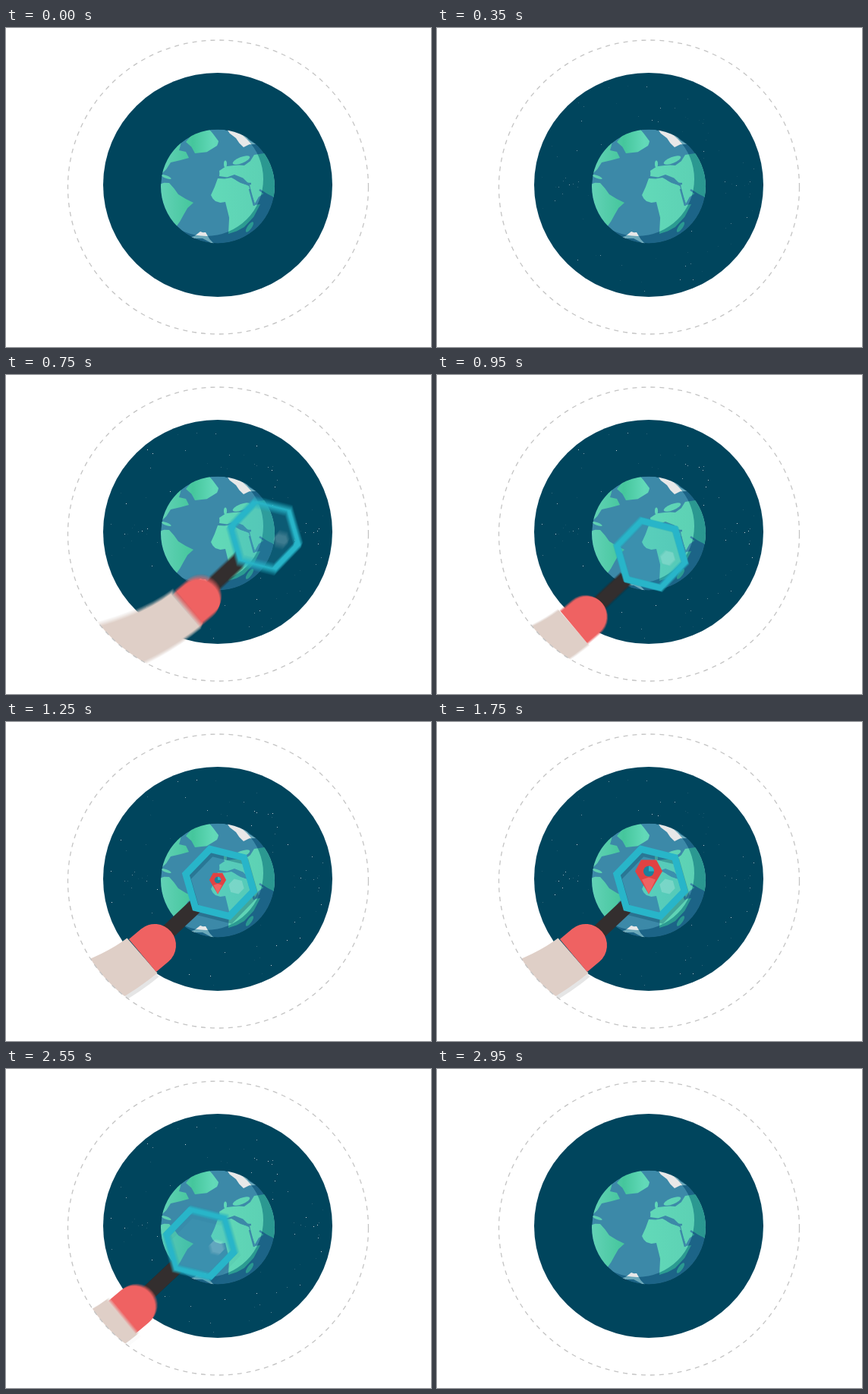
These frames come from a looping animation (560 by 420 pixels, 3.05 s). An HTML page with a canvas:

```html
<!DOCTYPE html>
<html lang="en">
<head>
<meta charset="utf-8">
<title>Exploring the globe</title>
<style>
  html, body { margin: 0; width: 100%; height: 100%; overflow: hidden; background: #fff; }
  canvas { display: block; }
</style>
</head>
<body>
<canvas id="stage" width="560" height="420"></canvas>
<script>
const W = 560, H = 420, LOOP = 3050, STEP = 50, SHUTTER = 16, SAMPLES = 12;
const TAU = Math.PI * 2, DEG = Math.PI / 180;
const OCEAN = '#3c89a8', TEAL = '#28b5c9', RED = '#ef6262';
const stage = document.getElementById('stage').getContext('2d');
const layer = () => Object.assign(document.createElement('canvas'), { width: W, height: H }).getContext('2d');
const scene = layer(), pose = layer();

const clamp = v => Math.max(0, Math.min(1, v));
const ramp = (t, a, b) => clamp((t - a) / (b - a));
let seed = 11;
const random = () => (seed = seed * 16807 % 2147483647) / 2147483647;

function fill(c, shape, color) {
  c.fillStyle = color;
  c.fill(shape);
}

function stroke(c, shape, color, width) {
  c.strokeStyle = color;
  c.lineWidth = width;
  c.stroke(shape);
}

function ellipse(x, y, rx, ry = rx, turn = 0) {
  const p = new Path2D();
  p.ellipse(x, y, rx, ry, turn * DEG, 0, TAU);
  return p;
}

function hexagon(x, y, r) {
  const p = new Path2D();
  for (let i = 0; i < 6; i++) {
    const a = 14 * DEG + i * TAU / 6;
    p.lineTo(x + r * Math.cos(a), y + r * Math.sin(a));
  }
  p.closePath();
  return p;
}

// Joins a few corner points with slightly ragged edges.
function coast(corners) {
  const nums = corners.split(' ').map(Number), p = new Path2D();
  for (let i = 0; i < nums.length; i += 2) {
    const [x, y] = [nums[i], nums[i + 1]];
    const [nx, ny] = [nums[(i + 2) % nums.length], nums[(i + 3) % nums.length]];
    const bump = (random() - .5) * .25;
    p.lineTo(x, y);
    p.lineTo((x + nx) / 2 + (y - ny) * bump, (y + ny) / 2 + (nx - x) * bump);
  }
  p.closePath();
  return p;
}

const ring = ellipse(279.5, 209.5, 198, 193.5);
const sky = ellipse(279, 206.5, 151, 147.5);
const globe = ellipse(279, 208.5, 75);

const lands = [
  coast('237 150 265 130 280 149 278 155 249 165'),                                   // Greenland
  coast('231 149 228 161 237 163 241 171 217 177 204 193 198 176'),                   // North America
  coast('202 206 215 204 227 219 247 230 234 246 224 262 202 240'),                   // South America
  coast('279 198 297 197 320 208 328 233 335 232 314 262 293 271 289 229 276 228 270 220'), // Africa
  coast('281 195 281 188 300 181 314 181 327 167 350 163 358 226 341 217 328 231 321 206 301 193'), // Eurasia
  ellipse(310, 174, 12, 4, -22),
  ellipse(289, 179, 2, 4.5),
  ellipse(321, 262, 2.8, 8, 35),
  ellipse(211, 196, 7, 1.8, 20)
];
const seas = new Path2D('M300 196Q310 206 323 205M321 212L327 234M334 213L346 221');
const ice = [
  coast('289 130 314 140 329 153 313 157 303 145'),
  coast('240 277 256 268 263 269 276 286')
];

const green = scene.createLinearGradient(204, 0, 354, 0);
[[0, '#62d2b6'], [.28, '#45c69c'], [.46, '#62d9b8'], [1, '#5bcfb3']].forEach(s => green.addColorStop(...s));

const night = new Path2D();
night.addPath(globe);
night.addPath(ellipse(264, 199, 75));

function drawGlobe(c) {
  c.save();
  c.clip(globe);
  fill(c, globe, OCEAN);
  lands.forEach(p => fill(c, p, green));
  stroke(c, seas, OCEAN, 2.5);
  ice.forEach(p => fill(c, p, '#e8e8e8'));
  c.globalCompositeOperation = 'multiply';
  c.fillStyle = '#75bacd';
  c.fill(night, 'evenodd');
  c.restore();
}

const stars = Array.from({ length: 80 }, () => {
  const a = random() * TAU, r = Math.sqrt(.22 + random() * .74);
  return { x: 279 + 149 * r * Math.cos(a), y: 206.5 + 145 * r * Math.sin(a), phase: random() * TAU };
});

function drawStars(c, t) {
  const shown = ramp(t, 0, 500) * (1 - ramp(t, 2650, 2950));
  c.fillStyle = '#fff';
  for (const s of stars) {
    c.globalAlpha = shown * (.08 + .7 * Math.sin(t / 500 + s.phase) ** 4);
    c.fillRect(Math.round(s.x), Math.round(s.y), 1, 1);
  }
  c.globalAlpha = 1;
}

// The lens slides in, spirals to rest at 1200 ms and drops away after 2250 ms.
function lensAt(t) {
  const left = clamp((1200 - t) / 700);
  const r = 115 * left ** 1.5, a = (146 - 296 * left ** 1.6) * DEG;
  const lead = Math.min(0, t - 500);
  const out = Math.max(0, (t - 2250) / 300);
  return [
    281.5 + r * Math.cos(a) + .89 * lead - 25.5 * out ** 3,
    211.5 + r * Math.sin(a) - 1.06 * lead + 18 * out ** 3.8
  ];
}

const frame = hexagon(0, 0, 46);
const glint = hexagon(22, 5, 10.5);
const handle = new Path2D('M-32 31L-80 76');
const sleeve = new Path2D('M-122 73Q-185 121 -340 140L-340 222Q-173 194 -82 119Z');
const grip = new Path2D('M21 -28L0 -28A28 28 0 0 0 0 28L21 28Z');

function drawHand(c, [x, y], depth) {
  c.save();
  c.translate(x, y);
  c.save();
  c.translate(2, 5);
  fill(c, sleeve, `rgba(0,0,0,${.1 * depth})`);
  c.restore();

  fill(c, frame, 'rgba(55,170,195,.22)');
  c.save();
  c.translate(2, 5);
  stroke(c, frame, `rgba(0,60,90,${.3 * depth})`, 9);
  c.restore();
  fill(c, glint, 'rgba(255,255,255,.2)');

  fill(c, sleeve, '#dfcfc7');
  stroke(c, handle, '#332e2e', 20);
  c.save();
  c.translate(-85.5, 82.5);
  c.rotate(140 * DEG);
  fill(c, grip, RED);
  c.restore();
  stroke(c, frame, TEAL, 9);
  c.restore();
}

// Averages several poses within the shutter time to blur the motion.
function drawBlurredHand(c, t) {
  const depth = ramp(t, 950, 1150) * (1 - ramp(t, 2250, 2600));
  for (let i = 0; i < SAMPLES; i++) {
    pose.drawImage(scene.canvas, 0, 0);
    pose.save();
    pose.clip(ring);
    drawHand(pose, lensAt(t + SHUTTER * ((i + .5) / SAMPLES - .5)), depth);
    pose.restore();
    c.globalAlpha = 1 / (i + 1);
    c.drawImage(pose.canvas, 0, 0);
  }
  c.globalAlpha = 1;
}

const pinBody = new Path2D('M-10 -45L10 -45 18 -30 0 0 -18 -30Z');
const pinTip = new Path2D('M-9 -19L0 -22 9 -19 0 0Z');
const pinQuarter = new Path2D('M0 -37A7 7 0 0 1 7 -30L0 -30Z');

function drawPin(c, t) {
  const u = ramp(t, 1200, 1500) - 1;
  const size = (1 + 2.7 * u ** 3 + 1.7 * u ** 2) * (1 - ramp(t, 2250, 2450) ** 2);
  c.save();
  c.translate(279, 226.5);
  c.scale(size, size);
  fill(c, pinBody, '#e04243');
  fill(c, pinTip, RED);
  fill(c, ellipse(0, -30, 7), '#1d7f9b');
  fill(c, pinQuarter, TEAL);
  c.restore();
}

function render(t) {
  scene.fillStyle = '#fff';
  scene.fillRect(0, 0, W, H);
  fill(scene, sky, '#00455d');
  drawStars(scene, t);
  drawGlobe(scene);
  drawBlurredHand(stage, t);
  if (t > 1200 && t < 2450) drawPin(stage, t);
  stage.setLineDash([6, 6]);
  stroke(stage, ring, '#c4c4c4', 1.3);
  stage.setLineDash([]);
}

const start = performance.now();
let last = -1;
function tick() {
  const t = Math.floor((performance.now() - start) % LOOP / STEP) * STEP;
  if (t !== last) render(last = t);
  requestAnimationFrame(tick);
}
tick();
</script>
</body>
</html>
```
